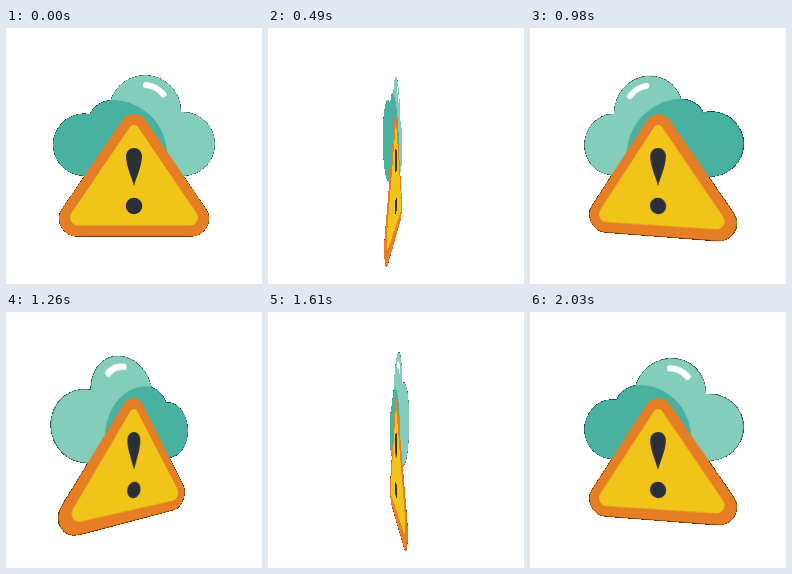
Write an HTML page that moves like this. It is 256 px wide and 256 px high and loops after 2100 ms.

```html
<!DOCTYPE html>
<html lang="en">
<head>
<meta charset="utf-8">
<title>Cloud warning</title>
<style>
  html, body { margin: 0; width: 100%; height: 100%; overflow: hidden; background: #fff; }
  /* 60 degree field of view over a 256px stage */
  .stage { width: 256px; height: 256px; perspective: 221.7px; filter: url(#rim); }
  .icon { display: block; width: 256px; height: 256px; animation: spin 2100ms steps(30) infinite; }
  .defs { position: absolute; width: 0; height: 0; }
  @keyframes spin {
    from { transform: rotateY(0deg); }
    to { transform: rotateY(360deg); }
  }
</style>
</head>
<body>
<svg class="defs">
  <!-- hard dark rim behind the soft edge pixels -->
  <filter id="rim" color-interpolation-filters="sRGB">
    <feComponentTransfer in="SourceAlpha" result="edge">
      <feFuncA type="discrete" tableValues="0 1 1"/>
    </feComponentTransfer>
    <feMerge>
      <feMergeNode in="edge"/>
      <feMergeNode in="SourceGraphic"/>
    </feMerge>
  </filter>
</svg>
<div class="stage">
  <svg class="icon" viewBox="0 0 256 256">
    <g fill="#84cdba">
      <circle cx="139" cy="83" r="36"/>
      <circle cx="177" cy="116" r="32"/>
      <path d="M106 84H177V148H106Z"/>
    </g>
    <g fill="#48b19f">
      <circle cx="78.3" cy="116.7" r="31.3"/>
      <circle cx="106" cy="97" r="25"/>
      <path d="M106 72A55 55 0 0 1 161 127V148H78V117Z"/>
    </g>
    <path d="M140 57A26 26 0 0 1 157.5 66.5" fill="none" stroke="#fff" stroke-width="6" stroke-linecap="round"/>
    <path fill="#e57e25" d="M116.2 92.5A14 14 0 0 1 139.8 92.5L200.2 180.9A18 18 0 0 1 185 208.5H71A18 18 0 0 1 55.8 180.9Z"/>
    <path fill="#f0c419" d="M123.8 99.3A5 5 0 0 1 132.2 99.3L190.7 185.2A8 8 0 0 1 184 197.5H72A8 8 0 0 1 65.3 185.2Z"/>
    <g fill="#2b2f38">
      <path d="M128 158C126 150 120 138 120 128A8 8 0 0 1 136 128C136 138 130 150 128 158Z"/>
      <circle cx="128" cy="178" r="8.3"/>
    </g>
  </svg>
</div>
</body>
</html>
```
